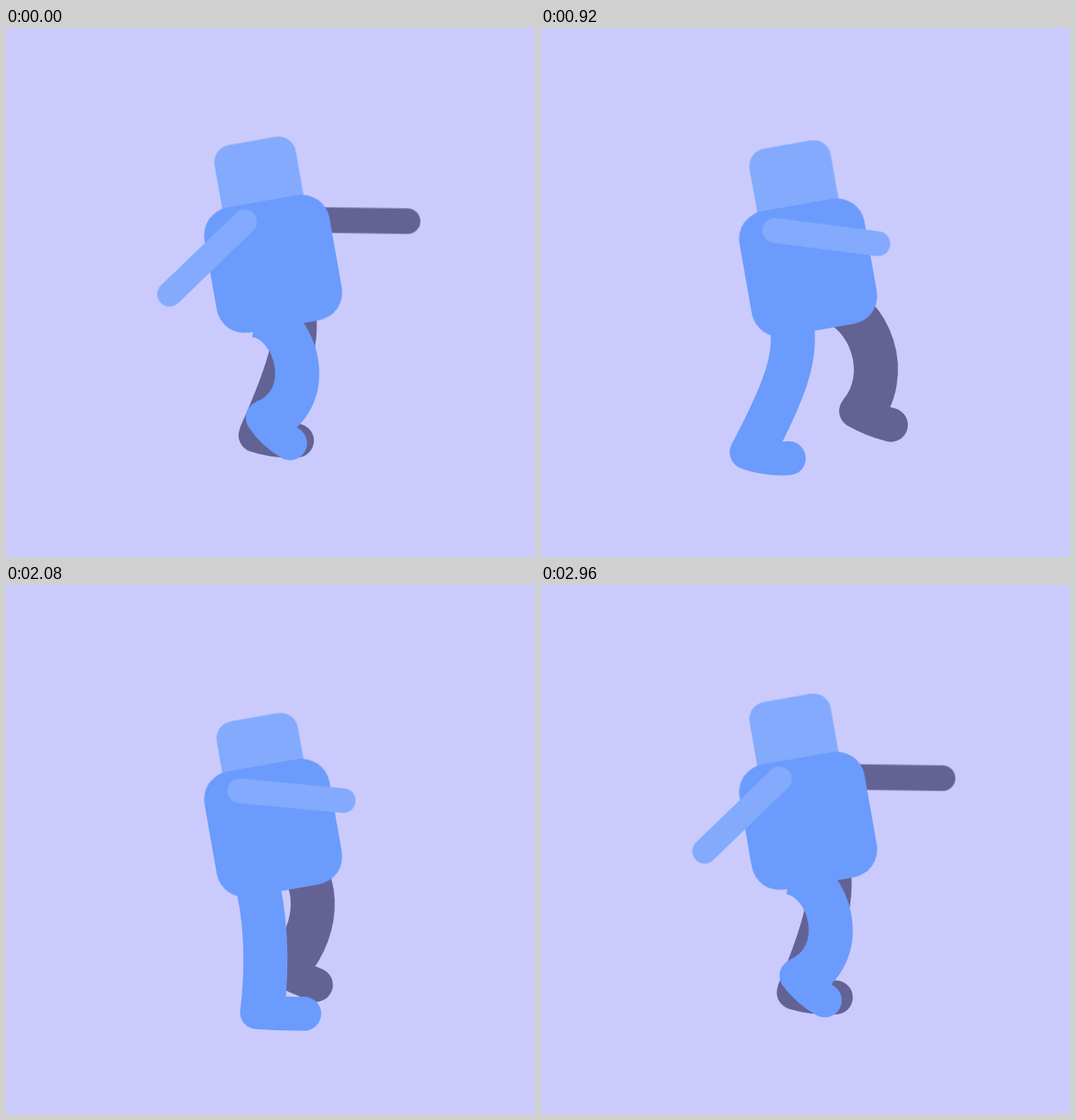
Animation of 600 by 600 pixels, one loop 3 s. Source, as an HTML page without scripts:

```html
<!DOCTYPE html>
<html lang="en">
<head>
<meta charset="utf-8">
<title>Walk cycle</title>
<style>
html, body { margin: 0; width: 100%; height: 100%; overflow: hidden; background: #cacbfc; }
svg { display: block; width: 100vw; height: 100vh; }
path { fill: none; }
.near { --skin: #6b9bfc; --limb: #83aafc; --lag: 0s; }
.far { --skin: #626394; --limb: #626394; --lag: -.75s; }
.leg, .foot { stroke: var(--skin); animation: leg 1.5s linear var(--lag) infinite; }
.leg { stroke-width: 50px; }
.foot { stroke-width: 38.5px; stroke-linecap: round; animation-name: foot; }
.arm {
  stroke: var(--limb); stroke-width: 28px; stroke-linecap: round;
  animation: nearArm 1.5s cubic-bezier(.75, 0, .2, 1) infinite;
}
.far .arm { stroke-width: 29px; animation-name: farArm; animation-delay: -1.49s; }
.bob { animation: bob .75s infinite; }
.head { animation: nod .75s ease-in-out infinite; }

@keyframes nearArm {
  0%, 5%, 92.7%, 100% { transform: translate(270.5px, 220px) rotate(136deg); }
  42.7%, 55% { transform: translate(265px, 225.5px) rotate(4.5deg); }
}
@keyframes farArm {
  0%, 5%, 92.7%, 100% { transform: translate(336px, 217.5px) rotate(.8deg); }
  42.7%, 55% { transform: translate(336px, 217.5px) rotate(132deg); }
}
@keyframes bob {
  0% { transform: none; animation-timing-function: cubic-bezier(.6, 0, .75, 1); }
  54.7% { transform: translateY(21px); animation-timing-function: ease-in-out; }
  94.7%, 100% { transform: none; }
}
@keyframes nod {
  0%, 29%, 94%, 100% { transform: none; }
  74% { transform: translateY(15px); }
}
/* key poses of one stride: the hip stays, the knee bends, the ankle meets the heel */
@keyframes leg {
  0%, 100% { d: path("M282 326C330 331 356 422 293 447"); }
  14.7% { d: path("M282 326C337 345 360 412 330 461"); }
  30% { d: path("M282 326C347 382 347 432 330 490"); }
  40% { d: path("M282 326C287 372 290 428 285 484"); animation-timing-function: ease-out; }
  50% { d: path("M282 326C296 362 284 403 248 484"); animation-timing-function: cubic-bezier(.8, 0, 1, .8); }
  64.7% { d: path("M282 326C292 378 262 430 223 484"); }
  75% { d: path("M282 326C275 386 243 430 198 477"); }
  80% { d: path("M282 326C276 388 252 422 209 469"); }
  90% { d: path("M282 326C326 350 325 416 283 457"); animation-timing-function: ease-out; }
}
@keyframes foot {
  0%, 100% { d: path("M291 442Q303 460 322 471"); }
  14.7% { d: path("M325 458Q345 466 367 470"); }
  30% { d: path("M324 489Q346 490 368 488"); }
  40% { d: path("M279 484Q306 486 334 486"); animation-timing-function: ease-out; }
  50% { d: path("M243 482Q264 489 290 488"); animation-timing-function: cubic-bezier(.8, 0, 1, .8); }
  64.7% { d: path("M218 480Q240 490 267 488"); }
  75% { d: path("M193 473Q212 488 239 488"); }
  80% { d: path("M205 465Q221 482 246 484"); }
  90% { d: path("M279 453Q300 463 321 472"); animation-timing-function: ease-out; }
}
</style>
</head>
<body>
<svg viewBox="0 0 600 600">
  <g class="far">
    <g class="bob"><path class="arm" d="M0 0H119.5"/></g>
    <g transform="translate(40 -20)">
      <path class="leg"/>
      <path class="foot"/>
    </g>
  </g>
  <g class="near">
    <g class="bob">
      <g transform="translate(303 267.5) rotate(-10)">
        <rect class="head" x="-46" y="-141.5" width="93.5" height="94" rx="20" fill="#83aafc"/>
        <rect x="-72" y="-72" width="144" height="144" rx="32" fill="#6b9bfc"/>
      </g>
    </g>
    <path class="leg"/>
    <path class="foot"/>
    <g class="bob"><path class="arm" d="M0 0H118"/></g>
  </g>
</svg>
</body>
</html>
```
